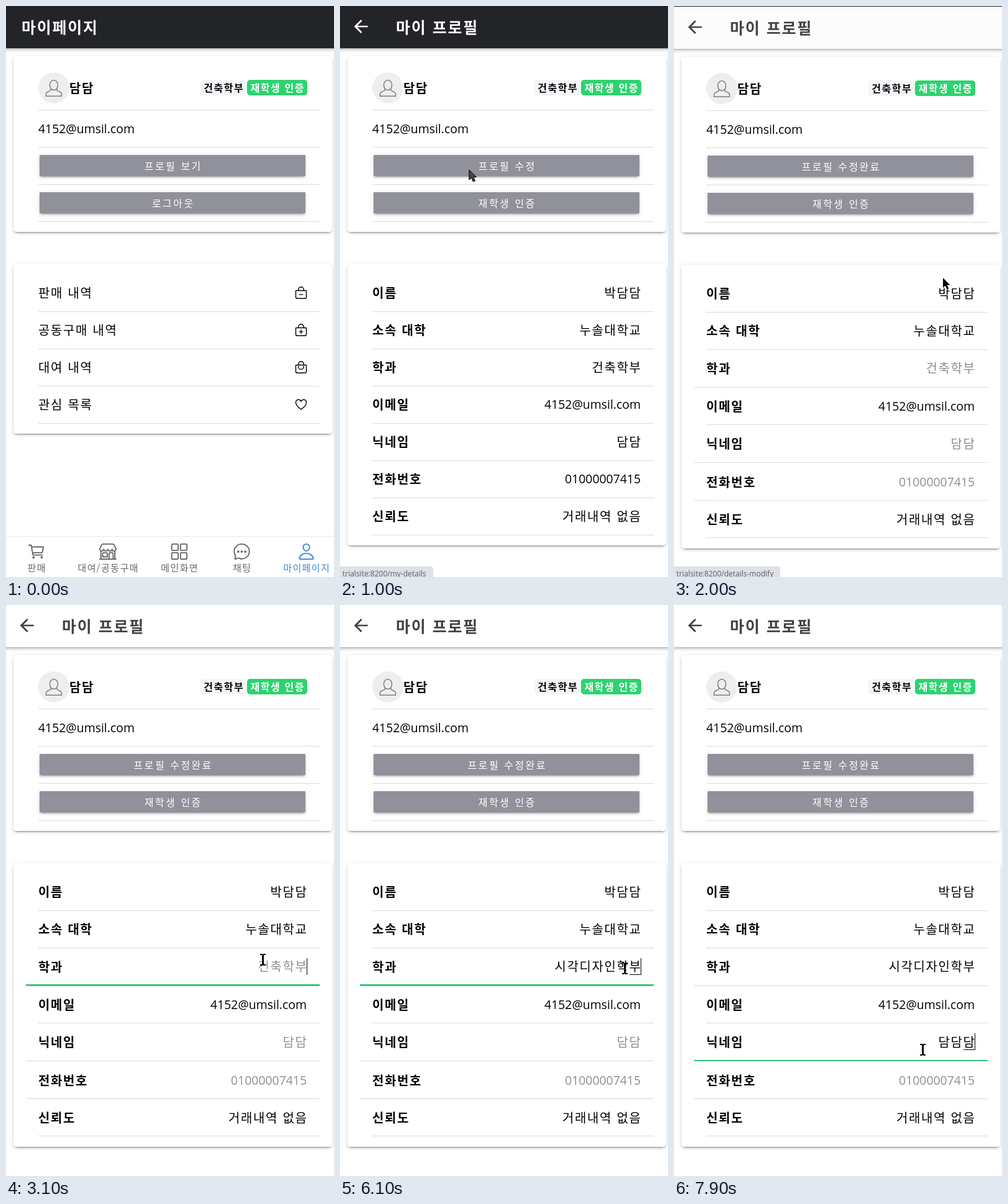
Recreate the animation shown at these times as an HTML page with a canvas. Size 528 px wide and 920 px high, loop 8000 ms.

```html
<!DOCTYPE html>
<html lang="ko">
<head>
<meta charset="utf-8">
<title>마이페이지</title>
<style>
html, body { margin: 0; width: 100%; height: 100%; overflow: hidden; background: #fff; }
canvas { display: block; }
</style>
</head>
<body>
<canvas id="stage" width="528" height="920"></canvas>
<script>
const W = 528, H = 920, LOOP = 8000;
const stage = document.getElementById('stage').getContext('2d');
const layerCanvas = document.createElement('canvas');
layerCanvas.width = W;
layerCanvas.height = H;
const layer = layerCanvas.getContext('2d');
let ctx = stage;

const HANGUL = '"Noto Sans CJK KR", "Noto Sans CJK JP", sans-serif';
const LATIN = '"Open Sans", "Noto Sans", sans-serif';
const GREEN = '#2dd36f', DARK = '#222428', INK = '#000', FAINT = '#8f8f8f';

const TITLE = { size: 25, gap: 1.75, weight: 700 };
const ITEM = { size: 20, gap: 1.6, weight: 400 };
const LABEL = { size: 20, gap: 1.6, weight: 700 };
const BUTTON = { size: 16, gap: 2.45, weight: 400 };
const BADGE = { size: 16, gap: 1.5, weight: 700 };
const TAB = { size: 15, gap: 1.4, weight: 400 };

const NICK = '담담', EMAIL = '4152@umsil.com', DEPT = '건축학부';
const FIELDS = [
  ['이름', '박담담'], ['소속 대학', '누솔대학교'], ['학과', DEPT], ['이메일', EMAIL],
  ['닉네임', NICK], ['전화번호', '01000007415'], ['신뢰도', '거래내역 없음']
];

// Outline icons on a 512 grid
const BAG = 'M80 176a16 16 0 00-16 16v216c0 30 26 56 56 56h272c30 0 56-25 56-55V192a16 16 0 00-16-16zM160 176v-32a96 96 0 01192 0v32';
const ICONS = {
  minus: BAG + 'M320 320H192',
  plus: BAG + 'M256 256v128M320 320H192',
  handle: BAG + 'M160 224v16a96 96 0 00192 0v-16',
  heart: 'M353 80C288 80 256 144 256 144s-32-64-97-64c-53 0-94 44-95 97-1 109 87 187 183 252a16 16 0 0018 0c96-65 184-143 183-252-1-53-42-97-95-97z',
  cart: 'M160 416a16 16 0 1032 0a16 16 0 10-32 0M384 416a16 16 0 1032 0a16 16 0 10-32 0M48 80h64l48 272h256M160 288h249a8 8 0 008-6l29-144a8 8 0 00-8-10H128',
  shop: 'M448 448V240M64 240v208M382 48H130c-22 0-42 12-50 30L36 173c-14 32 10 68 48 69h2c31 0 56-25 56-52 0 27 26 52 57 52s57-23 57-52c0 27 25 52 57 52s57-23 57-52c0 29 25 52 57 52h2c37-1 61-37 47-69l-44-95C424 60 404 48 382 48zM32 464h448M136 288h80a24 24 0 0124 24v88H112v-88a24 24 0 0124-24zM288 464V312a24 24 0 0124-24h64a24 24 0 0124 24v152',
  grid: [[48, 48], [288, 48], [48, 288], [288, 288]].map(([x, y]) =>
    `M${x + 20} ${y}h136a20 20 0 0120 20v136a20 20 0 01-20 20h-136a20 20 0 01-20-20v-136a20 20 0 0120-20z`).join(''),
  chat: 'M87 380c2-4-1-10-4-15a200 200 0 01-35-114C48 139 141 48 256 48c100 0 184 70 204 162a199 199 0 014 41c0 113-89 205-205 205-18 0-43-4-56-8s-27-9-30-10a31 31 0 00-23 0L82 463a16 16 0 01-5 1 10 10 0 01-10-10z',
  person: 'M344 144c-4 53-44 96-88 96s-84-43-88-96c-4-55 35-96 88-96s92 42 88 96zM256 304c-87 0-175 48-192 139C62 454 69 464 80 464h352c11 0 18-10 16-21C431 352 343 304 256 304z'
};
for (const k in ICONS) ICONS[k] = new Path2D(ICONS[k]);
const ARROW_BACK = new Path2D('M427 235H167L287 115 256 85 85 256l171 171 30-30L167 277H427z');
const AVATAR = new Path2D('M72 133.5v2.5c-3 2-7.5 2-7.5 6v3.2h25v-3.2c0-4-4.5-4-7.5-6v-2.5');
const POINTER = new Path2D('M0 0V16l3.7-3.3 2.8 6.3 2.9-1.3-2.8-6.1h4.8z');

function bezier(x1, y1, x2, y2) {
  const at = (s, a, b) => 3 * (1 - s) * (1 - s) * s * a + 3 * (1 - s) * s * s * b + s * s * s;
  return x => {
    if (x <= 0) return 0;
    if (x >= 1) return 1;
    let lo = 0, hi = 1;
    for (let i = 0; i < 24; i++) {
      const mid = (lo + hi) / 2;
      if (at(mid, x1, x2) < x) lo = mid; else hi = mid;
    }
    return at(lo, y1, y2);
  };
}
const pageEase = bezier(0.36, 0.66, 0.04, 1);

function rect(x, y, w, h, color) {
  ctx.fillStyle = color;
  ctx.fillRect(x, y, w, h);
}

function round(x, y, w, h, r, color) {
  ctx.fillStyle = color;
  ctx.beginPath();
  ctx.roundRect(x, y, w, h, r);
  ctx.fill();
}

function raised(x, y, w, h, r, color) {
  for (const [dy, blur, spread, alpha] of [[3.75, 1.25, -2.5, 0.2], [2.5, 2.5, 0, 0.14], [1.25, 6, 0, 0.12]]) {
    ctx.save();
    ctx.shadowColor = `rgba(0,0,0,${alpha})`;
    ctx.shadowOffsetY = dy;
    ctx.shadowBlur = blur;
    round(x - spread, y - spread, w + 2 * spread, h + 2 * spread, r, color);
    ctx.restore();
  }
  round(x, y, w, h, r, color);
}

// y is the middle of the glyphs
function text(str, x, y, style, color, align = 'left') {
  const latin = /^[\x20-\x7e]+$/.test(str);
  const size = latin ? style.size * 0.97 : style.size;
  const gap = latin ? 0 : style.gap;
  ctx.font = `${style.weight} ${size}px ${latin ? LATIN : HANGUL}`;
  ctx.letterSpacing = gap + 'px';
  ctx.wordSpacing = size * 0.07 + 'px';
  ctx.fillStyle = color;
  const w = ctx.measureText(str).width - gap;
  const left = align === 'right' ? x - w : align === 'center' ? x - w / 2 : x;
  ctx.fillText(str, left, y + size * (latin ? 0.36 : 0.38));
}

function icon(name, cx, cy, size, color) {
  ctx.save();
  ctx.translate(cx - size / 2, cy - size / 2);
  ctx.scale(size / 512, size / 512);
  ctx.strokeStyle = ctx.fillStyle = color;
  ctx.lineWidth = 32;
  ctx.lineCap = ctx.lineJoin = 'round';
  ctx.stroke(ICONS[name]);
  if (name === 'chat') {
    for (const x of [160, 256, 352]) {
      ctx.beginPath();
      ctx.arc(x, 256, 32, 0, 7);
      ctx.fill();
    }
  }
  ctx.restore();
}

function header(title, bg, fg, back) {
  const shade = ctx.createLinearGradient(0, 68, 0, 75);
  shade.addColorStop(0, 'rgba(0,0,0,.3)');
  shade.addColorStop(0.4, 'rgba(0,0,0,.1)');
  shade.addColorStop(1, 'rgba(0,0,0,0)');
  rect(0, 68, W, 7, shade);
  rect(0, 0, W, 68, bg);
  text(title, back ? 90 : 25, 34, TITLE, fg);
  if (!back) return;
  ctx.save();
  ctx.translate(17.2, 16.5);
  ctx.scale(33 / 512, 33 / 512);
  ctx.fillStyle = fg;
  ctx.fill(ARROW_BACK);
  ctx.restore();
}

function ripple(age, x, y) {
  if (age < 0) return;
  const p = Math.min(1, age / 225);
  ctx.save();
  ctx.beginPath();
  ctx.rect(54, 240, 428, 34);
  ctx.clip();
  ctx.fillStyle = `rgba(240,250,245,${0.15 + 0.3 * Math.min(1, age / 75)})`;
  ctx.beginPath();
  ctx.arc(x + (268 - x) * p, y + (257 - y) * p, 107 + 115 * p, 0, 7);
  ctx.fill();
  ctx.restore();
}

function line(y, x = 52) {
  rect(x, y, 505 - x, 1, '#dadada');
}

function profileCard(first, second, drawRipple) {
  raised(12, 81, 513, 283, 5, '#fff');
  ctx.fillStyle = '#eee';
  ctx.beginPath();
  ctx.arc(77, 132, 25, 0, 7);
  ctx.fill();
  ctx.strokeStyle = '#7d7f86';
  ctx.lineWidth = 1.5;
  ctx.stroke(AVATAR);
  ctx.beginPath();
  ctx.ellipse(77, 127.5, 6.5, 8, 0, 0, 7);
  ctx.stroke();
  text(NICK, 102, 132, LABEL, INK);
  round(313, 119, 75, 25, 5, '#f4f5f8');
  round(388, 119, 97, 25, 5, GREEN);
  text(DEPT, 350, 132, BADGE, INK, 'center');
  text('재학생 인증', 436.5, 132, BADGE, '#fff', 'center');
  text(EMAIL, 52, 198, ITEM, INK);
  for (let i = 0; i < 4; i++) line(167 + 60 * i);
  for (const y of [240, 300]) raised(54, y, 428, 34, 2, '#91919b');
  if (drawRipple) drawRipple();
  text(first, 268, 258, BUTTON, '#fff', 'center');
  text(second, 268, 318, BUTTON, '#fff', 'center');
}

function myPage(t) {
  rect(0, 0, W, H, '#fff');
  header('마이페이지', DARK, '#fff', false);
  profileCard('프로필 보기', '로그아웃', () => ripple(t - 720, 209, 264));
  raised(12, 416, 513, 273, 5, '#fff');
  [['판매 내역', 'minus'], ['공동구매 내역', 'plus'], ['대여 내역', 'handle'], ['관심 목록', 'heart']].forEach(([s, ic], i) => {
    const y = 462 + 60 * i;
    text(s, 52, y, ITEM, INK);
    icon(ic, 475, y, 22.7, INK);
    line(y + 30);
  });
  rect(0, 854, W, 66, '#fff');
  rect(0, 854, W, 1, '#e8e8e8');
  [['판매', 'cart', 49], ['대여/공동구매', 'shop', 164], ['메인화면', 'grid', 279], ['채팅', 'chat', 379.5], ['마이페이지', 'person', 483.5]].forEach(([s, ic, x], i) => {
    const color = i === 4 ? '#3b86de' : '#666';
    icon(ic, x, 879, 30, color);
    text(s, x, 905, TAB, color, 'center');
  });
}

function viewPage(t) {
  rect(0, 0, W, H, '#fff');
  header('마이 프로필', DARK, '#fff', true);
  profileCard('프로필 수정', '재학생 인증', () => ripple(t - 1786, 253, 256));
  raised(12, 416, 513, 453, 5, '#fff');
  FIELDS.forEach(([label, value], i) => {
    const y = 462 + 60 * i;
    text(label, 52, y + 0.6, LABEL, INK);
    text(value, 484, y + 0.4, ITEM, INK, 'right');
    line(y + 30);
  });
}

// Typed text: start time and state of each step
const DEPT_KEYS = [
  [3300, 'ㅅ'], [3400, '시'], [3600, '식'], [3800, '시가'], [3900, '시각'], [4200, '시각ㄷ'],
  [4300, '시각디'], [4500, '시각딪'], [4600, '시각디자'], [4700, '시각디장'], [4800, '시각디자이'],
  [4900, '시각디자인'], [5200, '시각디자인하'], [5300, '시각디자인학'], [5500, '시각디자인학ㅂ'], [5600, '시각디자인학부']
];
const NICK_KEYS = Array.from({ length: 9 }, (_, i) =>
  [7100 + 100 * i, '담'.repeat(Math.floor(i / 3)) + 'ㄷ다담'[i % 3]]);
const FOCUS_DEPT = 2400, FOCUS_NICK = 6500;

function typed(keys, t) {
  let s = '';
  for (const [at, str] of keys) if (t >= at) s = str;
  return s;
}

function editPage(t) {
  rect(0, 0, W, H, '#fff');
  header('마이 프로필', '#fff', '#424242', true);
  profileCard('프로필 수정완료', '재학생 인증');
  raised(12, 416, 513, 457, 5, '#fff');
  const mids = [462, 522, 582.6, 644, 704, 766, 826];
  const lines = [492, 552, 613, 673, 734, 795, 855];
  const focus = t >= FOCUS_NICK ? 4 : t >= FOCUS_DEPT ? 2 : -1;
  FIELDS.forEach(([label, value], i) => {
    const editable = i === 2 || i === 4 || i === 5;
    const entry = i === 2 ? typed(DEPT_KEYS, t) : i === 4 ? typed(NICK_KEYS, t) : '';
    text(label, 52, mids[i] + 0.4, LABEL, INK);
    text(entry || value, 484, mids[i] + 0.2, ITEM, editable && !entry ? FAINT : INK, 'right');
    if (i !== focus) return line(lines[i], editable ? 32 : 52);
    const tall = i === 2 ? 3 : 2;
    rect(32, i === 2 ? 611 : 733, 473, tall, '#36c77b');
    if (entry) rect(466, Math.round(mids[i] + 12), 18, 1, INK);
    if (t < 2900 || t >= 3100) rect(484, Math.round(mids[i] - 14), 1, 27, INK);
  });
}

// Fades and lifts the next page over the current one
function enter(page, t, start) {
  const p = pageEase((t - start) / 280);
  ctx = layer;
  page(t);
  ctx = stage;
  ctx.globalAlpha = 0.01 + 0.99 * p;
  ctx.drawImage(layerCanvas, 0, Math.round(50 * (1 - p)));
  ctx.globalAlpha = 1;
}

function status(str, w) {
  round(-6, 903, w + 6, 24, 4, '#dee1e6');
  ctx.font = `400 12px ${LATIN}`;
  ctx.letterSpacing = ctx.wordSpacing = '0px';
  ctx.fillStyle = '#5a5e63';
  ctx.fillText(str, 4, 918.5);
}

const MOVES = [
  [700, 208, 264], [1000, 208, 264], [1400, 253, 256], [1800, 253, 256], [2000, 433, 438],
  [2400, 413, 571], [6099, 413, 571], [6100, 458, 585], [6200, 458, 585], [6500, 400, 716], [LOOP, 400, 716]
];

function cursor(t) {
  if (t < 700) return;
  const i = MOVES.findIndex(m => m[0] > t);
  const [t0, x0, y0] = MOVES[i - 1], [t1, x1, y1] = MOVES[i];
  const p = (t - t0) / (t1 - t0);
  ctx.save();
  ctx.translate(Math.round(x0 + (x1 - x0) * p), Math.round(y0 + (y1 - y0) * p));
  if (t < 2300) {
    const over = t < 1850;
    ctx.fillStyle = over ? '#444' : '#000';
    ctx.strokeStyle = over ? '#111' : '#fff';
    ctx.lineWidth = 1;
    ctx.stroke(POINTER);
    ctx.fill(POINTER);
    if (over) ctx.stroke(POINTER);
  } else {
    rect(-1, -8, 3, 17, '#000');
    for (const y of [-9, 8]) {
      rect(-4, y, 4, 2, '#000');
      rect(1, y, 4, 2, '#000');
    }
  }
  ctx.restore();
}

function draw(t) {
  if (t < 1030) {
    myPage(t);
    if (t >= 750) enter(viewPage, t, 750);
  } else if (t < 2080) {
    viewPage(t);
    if (t >= 1800) enter(editPage, t, 1800);
  } else {
    editPage(t);
  }
  if (t >= 700 && t < 1100) status('trialsite:8200/my-details', 150);
  else if (t >= 1100 && t < 2300) status('trialsite:8200/details-modify', 171);
  cursor(t);
}

const begin = performance.now();
function tick() {
  draw((performance.now() - begin) % LOOP);
  requestAnimationFrame(tick);
}
tick();
</script>
</body>
</html>
```
